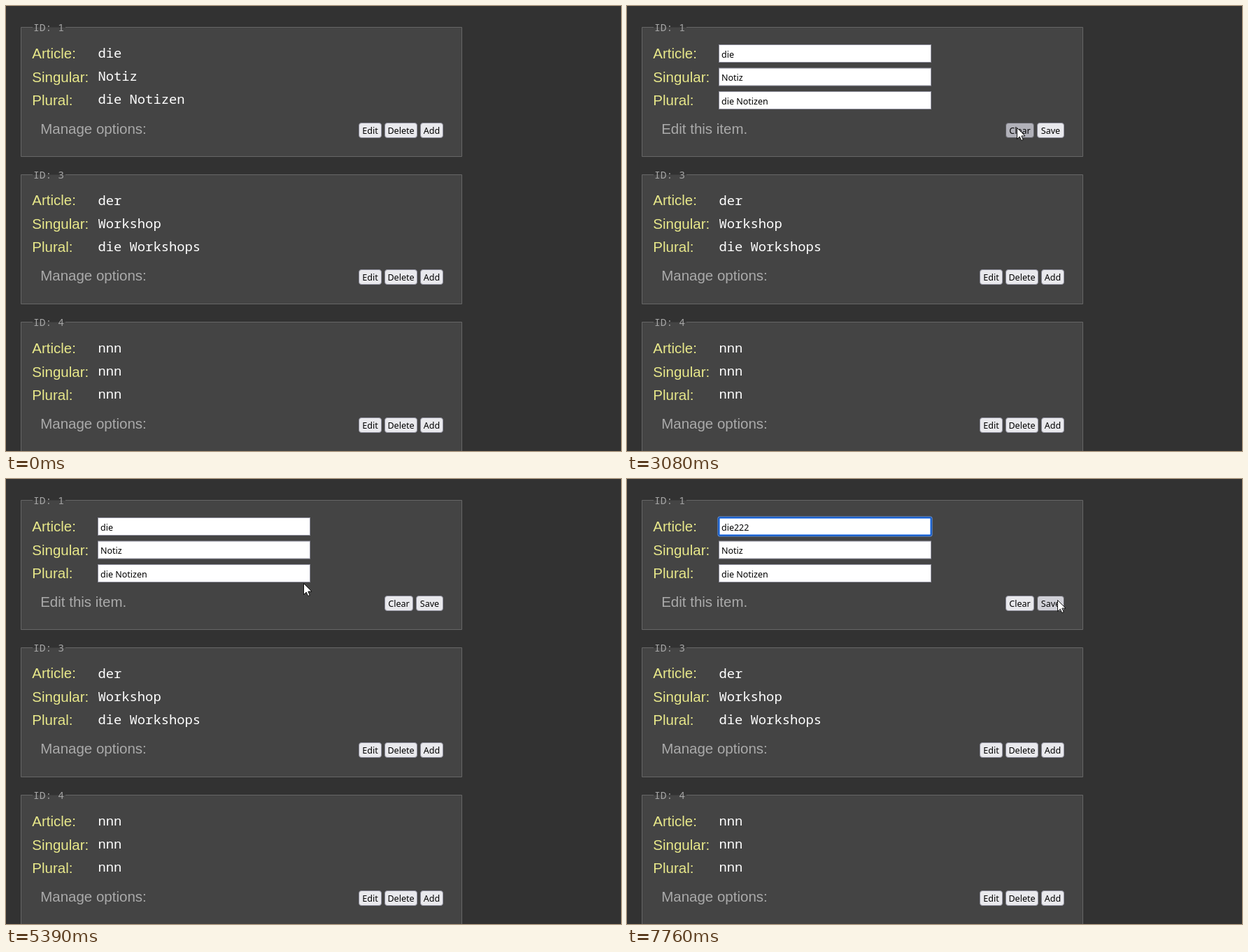
An HTML page for the animation above (8 s loop, 879x637 px).

```html
<!DOCTYPE html>
<html lang="en">
<head>
<meta charset="utf-8">
<title>Word list</title>
<style>
  html, body { margin: 0; width: 100%; height: 100%; overflow: hidden; background: #323232; }
  svg { display: block; }
  text { white-space: pre; }
  .label, .hint { font: 20.5px "Liberation Sans", Arial, sans-serif; fill: #e8e88a; }
  .hint { fill: #aaa; }
  .value, .id { font: 500 18.8px "Noto Sans Mono", monospace; fill: #fff; }
  .id { font-size: 14.67px; font-weight: 400; fill: #a5a5a5; }
  .ui { font: 12.5px "Noto Sans", "Open Sans", sans-serif; fill: #000; }
  .mid { text-anchor: middle; }
</style>
</head>
<body>
<svg id="stage" width="879" height="637" viewBox="0 0 879 637"></svg>
<script>
const LOOP = 8000, PITCH = 211, ROW = 33.5;
const stage = document.getElementById('stage');
const labels = ['Article:', 'Singular:', 'Plural:'];
const cards = [
  { id: 1, top: 0, words: ['die', 'Notiz', 'die Notizen'] },
  { id: 3, top: 210, words: ['der', 'Workshop', 'die Workshops'] },
  { id: 4, top: 422, words: ['nnn', 'nnn', 'nnn'] }
];
const viewButtons = [{ caption: 'Edit', w: 32 }, { caption: 'Delete', w: 46 }, { caption: 'Add', w: 32 }];
const editButtons = [{ caption: 'Clear', w: 40 }, { caption: 'Save', w: 38 }];

// Each move curves from where the last one ended, past "via", to "end"
const entry = [900, 738];
const moves = [
  { from: 290, to: 1010, steps: 6, via: [560, 330], end: [527, 180] },
  { from: 1960, to: 2620, steps: 6, via: [545, 140], end: [557, 174] },
  { from: 3660, to: 4260, steps: 5, via: [530, 178], end: [521, 177] },
  { from: 4990, to: 5840, steps: 7, via: [460, 160], end: [160, 69] },
  { from: 7050, to: 7210, steps: 2, via: [570, 135], end: [457, 135] },
  { from: 7360, to: 7760, steps: 4, via: [560, 175], end: [615, 173] }
];
const within = (t, from, to) => t >= from && t < to;
const clamp = (v, low, high) => Math.max(low, Math.min(high, v));

function pointerAt(t) {
  const i = moves.filter(m => t >= m.from).length - 1;
  if (i < 0 || within(t, 6270, 7050)) return null;
  const { from, to, steps, via, end } = moves[i];
  const start = i ? moves[i - 1].end : entry;
  const step = Math.floor((t - from) / (to - from) * (steps - 1) + 1e-6);
  const u = Math.min(step + 1, steps) / steps, v = 1 - u;
  return start.map((s, k) => Math.round(v * v * s + 2 * u * v * via[k] + u * u * end[k]));
}

function stateAt(t) {
  const focused = t >= 5698;
  return {
    pointer: pointerAt(t),
    editing: within(t, 1530, 3200) || t >= 4680,
    pressed: within(t, 1380, 1530) || within(t, 3080, 3200) || within(t, 4560, 4680),
    typed: clamp(Math.floor((t - 6260) / 160), 0, 3),
    focused,
    caret: focused && !within(t, 6270, 6420) && t < 7360
  };
}

const text = (kind, x, y, s) => `<text class="${kind}" x="${x}" y="${y}">${s}</text>`;
const rect = (x, y, w, h, attrs) => `<rect x="${x}" y="${y}" width="${w}" height="${h}" ${attrs}/>`;
const inside = (p, x, y, w, h) => p && p[0] >= x && p[0] <= x + w && p[1] >= y && p[1] <= y + h;
const inputBox = row => [131.5, 55.5 + row * ROW, 303, 25];

function button(caption, x, y, w, { pointer, pressed }) {
  const hover = inside(pointer, x, y, w, 21);
  const fill = !hover ? '#e9e9ed' : pressed ? '#b1b1b9' : '#d0d0d7';
  return rect(x, y, w, 21, `rx="3.5" fill="${fill}" stroke="${hover ? '#5e5e64' : '#8f8f9d'}"`) +
    text('ui mid', x + w / 2, y + 15.5, caption);
}

// Buttons are laid out leftwards from the right edge
function buttonRow(buttons, y, state) {
  let right = 624.5;
  return buttons.slice().reverse().map(({ caption, w }) => {
    const x = right - w;
    right = x - 5;
    return button(caption, x, y, w, state);
  }).join('');
}

function input(word, row, { focused, caret, typed }) {
  const [x, y, w, h] = inputBox(row);
  let out = rect(x, y, w, h, 'fill="#fff" stroke="#8f8f9d"');
  if (row === 0 && focused) {
    out += rect(x - 1.5, y - 1.5, w + 3, h + 3, 'rx="2" fill="none" stroke="#6b9de8"') +
      rect(x, y, w, h, 'rx="1" fill="none" stroke="#0b5cdb" stroke-width="2"');
    word += '2'.repeat(typed);
    if (caret) out += rect(154 + typed * 7.3, y + 5, 1, 16, 'fill="#000"');
  }
  return out + text('ui', x + 3.5, y + 18, word);
}

function card({ id, top, words }, i, state) {
  const frameTop = PITCH * i;
  const editing = i === 0 && state.editing;
  const rows = labels.map((label, row) =>
    text('label', 37.3, top + 75 + row * ROW, label) +
    (editing ? input(words[row], row, state)
             : text('value', 131.5, frameTop + 74 + row * 33, words[row])));
  return rect(21.5, frameTop + 30.5, 630, 185, 'fill="#444"') +
    `<path d="M38 ${frameTop + 30.5}H21.5v185h630v-185H85" fill="none" stroke="#666"/>` +
    text('id', 39, frameTop + 35.5, `ID: ${id}`) +
    rows.join('') +
    text('hint', 49.2, top + 183, editing ? 'Edit this item.' : 'Manage options:') +
    buttonRow(editing ? editButtons : viewButtons, top + 167.5, state);
}

function cursor({ pointer, editing }) {
  if (!pointer) return '';
  const [x, y] = pointer;
  if (editing && labels.some((_, row) => inside(pointer, ...inputBox(row)))) {
    return `<path d="M${x - 3} ${y - 8.5}h7m-3.5 0v17m-3.5 0h7" fill="none" stroke="#000"/>`;
  }
  return `<path transform="translate(${x} ${y})" d="M.5 .5V16.5L4.2 13L6.7 18.5L9.2 17.4L6.8 12H12Z"
    fill="#fff" stroke="#000" stroke-width=".9"/>`;
}

function frame(now) {
  const state = stateAt(now % LOOP);
  stage.innerHTML = cards.map((c, i) => card(c, i, state)).join('') + cursor(state);
  requestAnimationFrame(frame);
}
frame(performance.now());
</script>
</body>
</html>
```
